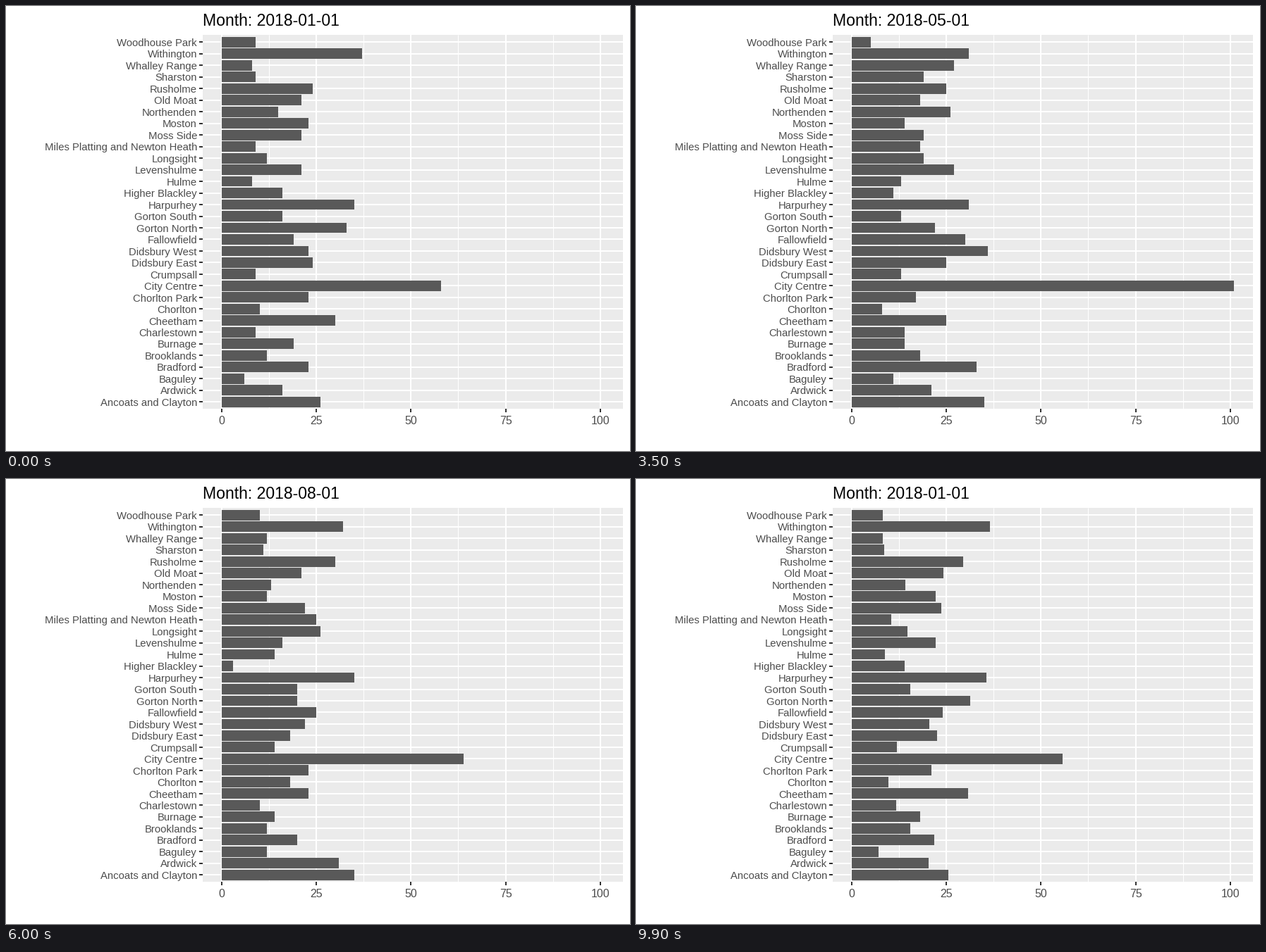
Write a matplotlib script that moves like this. It is 885 by 632 pixels and loops after 10 s.

```python
import numpy as np
import matplotlib.pyplot as plt
from matplotlib.animation import FuncAnimation
from matplotlib.patches import Rectangle

W, H, DPI = 885, 632, 64
PX = 72 / DPI                      # points per pixel
X0, UNIT = 305.98, 5.367           # zero of the value axis, pixels per unit
Y0, PITCH = 51.3, 16.48            # centre of the first row, row spacing
LEFT, RIGHT, TOP, BOTTOM = 279, 875, 41, 572
STEPS = 4
STARTS = [5, 14, 23, 32, 41, 49, 57, 65, 73, 81, 89, 97]

WARDS = [
    "Woodhouse Park", "Withington", "Whalley Range", "Sharston", "Rusholme",
    "Old Moat", "Northenden", "Moston", "Moss Side",
    "Miles Platting and Newton Heath", "Longsight", "Levenshulme", "Hulme",
    "Higher Blackley", "Harpurhey", "Gorton South", "Gorton North",
    "Fallowfield", "Didsbury West", "Didsbury East", "Crumpsall",
    "City Centre", "Chorlton Park", "Chorlton", "Cheetham", "Charlestown",
    "Burnage", "Brooklands", "Bradford", "Baguley", "Ardwick",
    "Ancoats and Clayton",
]

jan = [9, 37, 8, 9, 24, 21, 15, 23, 21, 9, 12, 21, 8, 16, 35, 16,
       33, 19, 23, 24, 9, 58, 23, 10, 30, 9, 19, 12, 23, 6, 16, 26]
mar = [20, 42, 12, 20, 28, 26, 7, 20, 16, 15, 18, 28, 13, 15, 35, 21,
       14, 16, 24, 31, 20, 65, 25, 8, 17, 10, 32, 12, 24, 11, 29, 25]
may = [5, 31, 27, 19, 25, 18, 26, 14, 19, 18, 19, 27, 13, 11, 31, 13,
       22, 30, 36, 25, 13, 101, 17, 8, 25, 14, 14, 18, 33, 11, 21, 35]
jul = [11, 16, 14, 11, 23, 26, 13, 13, 26, 29, 35, 19, 20, 8, 32, 25,
       23, 17, 25, 17, 13, 63, 18, 8, 24, 13, 12, 10, 19, 15, 40, 37]
sep = [9, 47, 11, 11, 37, 16, 13, 12, 18, 21, 18, 13, 9, 5, 38, 16,
       18, 33, 18, 20, 15, 57, 28, 27, 22, 7, 15, 13, 22, 10, 22, 33]
nov = [10, 40, 17, 10, 42, 37, 10, 23, 31, 21, 20, 26, 14, 7, 49, 15,
       16, 14, 19, 26, 23, 68, 28, 12, 41, 13, 27, 28, 22, 12, 18, 25]
dec = [6, 35, 9, 7, 46, 34, 12, 20, 32, 15, 23, 26, 11, 8, 37, 14,
       26, 39, 13, 18, 21, 49, 15, 9, 33, 20, 15, 26, 18, 10, 33, 24]


def between(a, b, centre, ward, low):
    """Month halfway between two others, with its highest and lowest ward set."""
    mid = np.round((np.array(a) + np.array(b)) / 2)
    mid[WARDS.index("City Centre")] = centre
    mid[WARDS.index(ward)] = low
    return mid


feb = between(jan, mar, 62, "Baguley", 5)
apr = between(mar, may, 60, "Chorlton", 6)
jun = between(may, jul, 71, "Chorlton", 6)
aug = between(jul, sep, 64, "Higher Blackley", 3)
octo = between(sep, nov, 75, "Charlestown", 5)
MONTHS = [np.array(m, float) for m in
          (jan, feb, mar, apr, may, jun, jul, aug, sep, octo, nov, dec)]

plt.rcParams["font.family"] = "Liberation Sans"
fig = plt.figure(figsize=(W / DPI, H / DPI), dpi=DPI, facecolor="white")
ax = fig.add_axes([0, 0, 1, 1])
ax.set_xlim(0, W)
ax.set_ylim(H, 0)
ax.axis("off")


def line(x1, y1, x2, y2, color, width):
    ax.plot([x1, x2], [y1, y2], color=color, lw=width * PX,
            solid_capstyle="butt")


def label(x, y, text, size, color, ha):
    return ax.text(x, y, text, fontsize=size * PX, color=color, ha=ha,
                   va="baseline")


ax.add_patch(Rectangle((LEFT, TOP), RIGHT - LEFT, BOTTOM - TOP,
                       fc="#EBEBEB", lw=0))
for v in (12.5, 37.5, 62.5, 87.5):
    line(X0 + v * UNIT, TOP, X0 + v * UNIT, BOTTOM, "white", 1)
for v in range(0, 101, 25):
    x = X0 + v * UNIT
    line(x, TOP, x, BOTTOM, "white", 2)
    line(x, BOTTOM, x, BOTTOM + 4.6, "#333333", 2)
    label(x, 593.5, str(v), 16, "#4D4D4D", "center")

bars = []
for i, ward in enumerate(WARDS):
    y = Y0 + i * PITCH
    line(LEFT, y, RIGHT, y, "white", 2)
    line(LEFT - 4.6, y, LEFT, y, "#333333", 2)
    label(271, y + 5.7, ward, 14.9, "#4D4D4D", "right")
    bar = Rectangle((X0, y - 0.45 * PITCH), 0, 0.9 * PITCH,
                    fc="#595959", lw=0, zorder=3)
    bars.append(ax.add_patch(bar))

title = label(LEFT, 28, "", 23, "black", "left")


def state(frame):
    """Bar values and the number of the nearest month."""
    done = sum(frame >= s for s in STARTS)
    if done == 0:
        return MONTHS[0], 0
    t = min((frame - STARTS[done - 1] + 1) / STEPS, 1)
    old, new = done - 1, done % 12
    values = MONTHS[old] * (1 - t) + MONTHS[new] * t
    return values, new if t >= 0.5 else old


def update(frame):
    values, month = state(frame)
    for bar, v in zip(bars, values):
        bar.set_width(v * UNIT)
    title.set_text(f"Month: 2018-{month + 1:02d}-01")
    return bars + [title]


anim = FuncAnimation(fig, update, frames=100, interval=100, repeat=True,
                     repeat_delay=0, init_func=lambda: update(0), blit=False)
plt.show()
```
